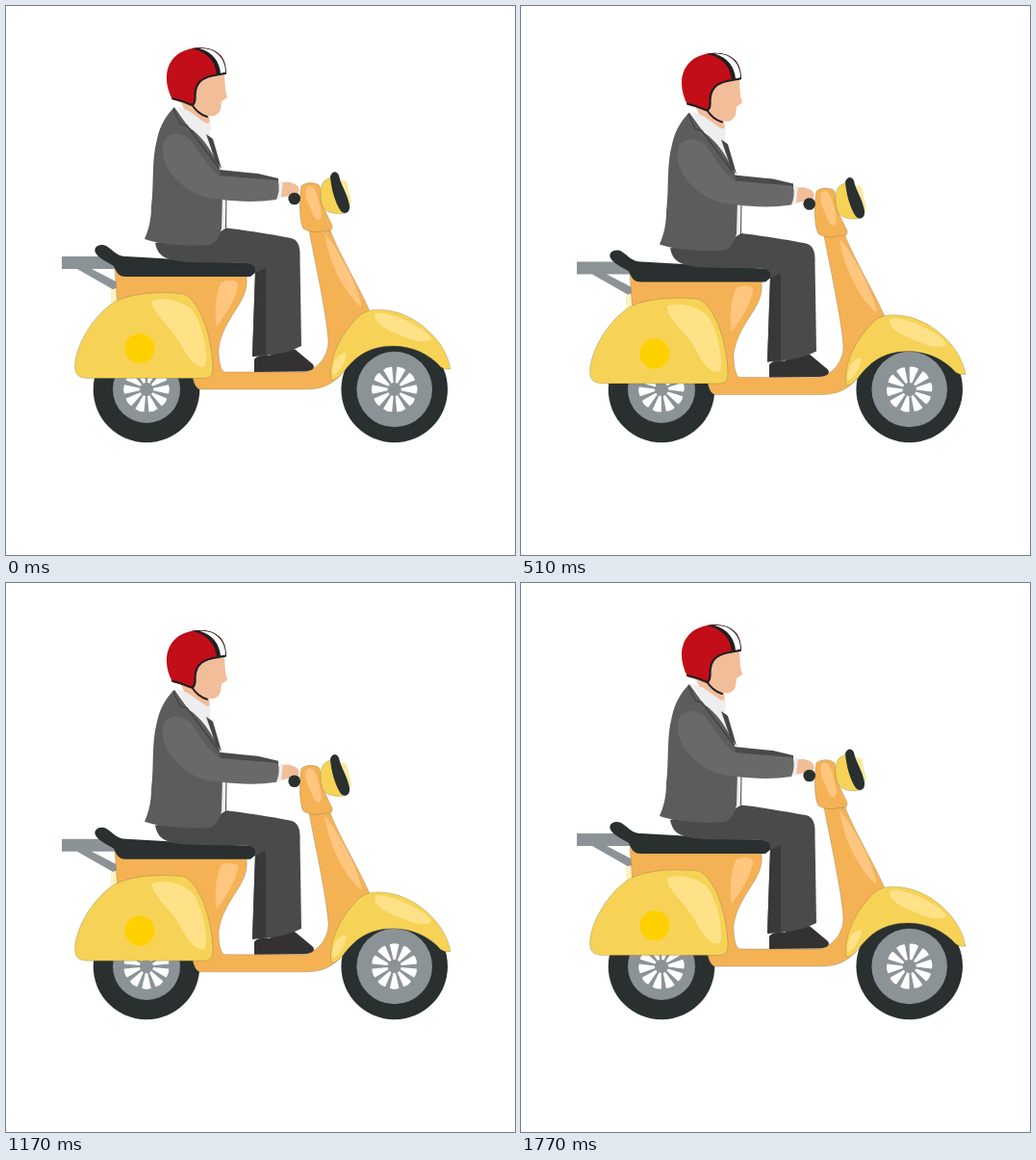
An HTML page that plays this animation: 529 by 570 pixels, repeating every 1.8 s.

```html
<!DOCTYPE html>
<html lang="en">
<head>
<meta charset="utf-8">
<title>Scooter ride</title>
<style>
html, body { margin: 0; width: 100%; height: 100%; overflow: hidden; background: #fff; }
svg { display: block; width: 529px; height: 570px; }
.dark { fill: #29302f; }
.metal { fill: #8b9397; }
.orange { fill: #f5b255; }
.orange-light { fill: #ffc67f; }
.yellow { fill: #f6d356; }
.orange, .yellow { stroke: #5a5040; stroke-opacity: .5; stroke-width: .5; }
.yellow-light { fill: #ffe288; }
.skin { fill: #f2bd99; }
.shirt { fill: #eeeef0; }
.line { fill: none; stroke: #211f20; stroke-linecap: round; stroke-linejoin: round; }
.seam { stroke: #454445; }
</style>
</head>
<body>
<svg viewBox="0 0 529 570">
  <defs>
    <path id="gap" d="M-1.2 -7L-4.8 -22.8Q0 -24.800 4.800 -22.800L1.200 -7Z" fill="#fff"/>
  </defs>

  <g transform="translate(146 398)">
    <circle class="dark" r="55.3"/>
    <circle class="metal" r="35"/>
    <g class="spokes"/>
  </g>
  <g transform="translate(403.7 398)">
    <circle class="dark" r="55.3"/>
    <circle class="metal" r="39.3"/>
    <g class="spokes"/>
  </g>

  <g id="ride">
    <!-- rack and frame -->
    <path class="metal" d="M58 260H114V273H89L116 287V297L74 273H58Z"/>
    <path fill="#fdf3c0" d="M109 295L117 292V315H109Z"/>
    <path class="orange" d="M113 272H258L250 282C253 308 226 322 221 356C221 368 223 380 228 380H312C326 375 335 362 335 348C333 318 321 266 315 233L337 233C345 255 370 297 378 317L375 340L347 384C338 393 328 398 312 398H201Q196 396 194 386L116 312Z"/>
    <path class="orange-light" d="M223 288C228 283 243 284 241 291C238 306 228 320 219 333C216 315 219 298 223 288Z"/>
    <path class="orange-light" d="M331 236C341 246 365 287 370 313C355 303 336 270 331 236Z"/>

    <!-- rear fender with round badge -->
    <path class="yellow" d="M72 378C69 362 85 325 113 307C135 296 168 297 185 299C203 308 214 345 215 375C215 384 212 386.500 205 386.500H85C77 386 73 384 72 378Z"/>
    <path class="yellow-light" d="M152 306C165 301 188 307 196 319C207 340 210 365 207 374C197 377 188 364 182 352C174 335 150 318 152 306Z"/>
    <circle cx="139" cy="355.500" r="15.500" fill="#ffd000"/>

    <!-- front fender -->
    <path class="yellow" d="M338 388C335 370 345 345 362 327C372 313 388 314 402 317C430 323 458 350 462 377Q457 378 452 375C440 361 422 353 402 353C376 353 362 365 350 381C345 386 340 390 338 388Z"/>
    <path class="yellow-light" d="M384 319C395 315 440 335 442 346C436 351 420 347 408 341C395 336 380 328 384 319Z"/>
    <path class="yellow-light" d="M354 360C345 360 339 370 339 381C340 387 352 376 354 360Z"/>

    <!-- steering head and lamp -->
    <path class="orange" d="M307 187C310 183 322 182 326 187L328 205L339 228C340 234 334 234 332 232C328 236 314 235 309 231C304 222 305 195 307 187Z"/>
    <path class="orange-light" d="M312 189C317 182 324 190 328 217C327 226 320 223 317 211C313 203 310 196 312 189Z"/>
    <path class="yellow" d="M329 184C333 178 339 178 343 178L353 215C342 217 331 214 329 208C326 200 326 190 329 184Z"/>
    <path fill="#fbe9a0" d="M345 180L354 182L359 204L355 210Z"/>
    <path class="dark" d="M337 177C339 171 344 171 346 176C348 186 355 195 357 207C358 215 352 217 348 213C342 204 338 190 337 177Z"/>

    <!-- seat -->
    <path class="dark" d="M93 256C90 250 98 246 104 249C112 254 115 260 125 260L160 262L250 267C260 267 262 273 259 277L254 281H125C116 281 115 276 112 270C106 266 96 262 93 256Z"/>

    <!-- legs -->
    <path fill="#343132" d="M258 380L258 367Q262 361 274 363C282 358 296 354 301 357L319 372C323 378 314 380 304 379.500Z"/>
    <path fill="#4b4a4a" d="M155 246C158 260 165 264 190 266L250 267Q260 268 259 275L256 364L270 363Q292 361 307 353L305.500 262C306 250 304 243 296 241C280 238 240 231 222 230Z"/>
    <path fill="#3a393a" d="M259 277L270 272V362L256 364Z"/>

    <!-- shirt, jacket and arms -->
    <path class="skin" d="M180 96H199L211 112L212 124L188 113Z"/>
    <path class="shirt" d="M177 104L190 109L208 122L213 121L212 134L224 170L229 201L228 231L220 236L198 140Z"/>
    <path fill="#4b4a4a" d="M222 170L262 174L283 179V185L222 180Z"/>
    <path fill="#5c5c5c" d="M175 105C165 115 160 125 157 138C151 160 154 185 151 208C151 222 148 233 144 242C160 248 195 250 212 248C220 245 222 237 224 231L225 195L222 168C214 150 203 134 190 126Z"/>
    <path fill="#474647" d="M208 133L215 138L224 169L218 162Z"/>
    <path class="line seam" stroke-width="1.500" d="M174 107L181 122L188 124L221 168"/>
    <path class="line seam" d="M229 201L228.500 230"/>
    <path fill="#696969" d="M164 141C170 128 187 132 194 142C203 156 211 168 222 176L281 181C286 184 286 196 281 201C262 204 240 203 224 201C205 200 190 193 180 183C166 170 160 155 164 141Z"/>
    <path class="skin" d="M285 184C292 181 301 184 304 188C306 194 303 199 295 197L285 199Z"/>
    <path class="shirt" d="M283 181L288 182L286 199L281 201Q285 192 283 181Z"/>
    <circle class="dark" cx="299.700" cy="200" r="6.300"/>

    <!-- head and helmet -->
    <path class="skin" d="M196 76L227 71L228 87L230 95L224 99L223 107C221 114 214 116 209 113L196 101Z"/>
    <path fill="#c10e18" d="M173 97C164 80 164 60 180 49C195 40 215 42 224 52C228 58 229 65 228 70L214 73C204 75 198 80 197 92C197 100 196 104 193 103C186 100 178 99 173 97Z"/>
    <path fill="#211f20" d="M193 44C210 48 218 58 219 72L229 70C229 59 225 50 214 45Q204 42 193 44Z"/>
    <path fill="#fff" d="M201 44C215 48 222 58 223 70L228 69C228 58 223 50 213 45.500Q207 43.500 201 44Z"/>
    <path class="line" stroke-width="2.200" d="M228 70L214 72.500C203 75 197 80 196.500 92Q197 104 192 102.500Q182 98 173 96"/>
    <path class="line" stroke-width="2" d="M193 102Q199 112 209 115"/>
  </g>
</svg>
<script>
const STEP = 30, LOOP = 1800, BOUNCE = 900, TURN = 1800, DROP = 6.5, GAPS = 10;
const ride = document.getElementById("ride");
const wheels = [...document.querySelectorAll(".spokes")];

for (const wheel of wheels) {
  wheel.innerHTML = Array.from({ length: GAPS }, (_, i) =>
    `<use href="#gap" transform="rotate(${(i + 0.5) * 360 / GAPS})"/>`).join("");
}

// Cubic Bézier (.25, .1, .25, 1), solved for x by bisection
const bezier = (a, b, u) => 3 * a * u * (1 - u) ** 2 + 3 * b * u * u * (1 - u) + u ** 3;
function ease(x) {
  let low = 0, high = 1;
  for (let i = 0; i < 24; i++) {
    const mid = (low + high) / 2;
    if (bezier(0.25, 0.25, mid) < x) low = mid; else high = mid;
  }
  return bezier(0.1, 1, low);
}

const start = performance.now();
function draw() {
  const t = Math.floor((performance.now() - start) % LOOP / STEP) * STEP;
  const phase = t % BOUNCE / BOUNCE * 2;
  const y = DROP * (phase < 1 ? ease(phase) : 1 - ease(phase - 1));
  ride.setAttribute("transform", `translate(0 ${y.toFixed(2)})`);
  for (const wheel of wheels) wheel.setAttribute("transform", `rotate(${t / TURN * 360})`);
  requestAnimationFrame(draw);
}
draw();
</script>
</body>
</html>
```
